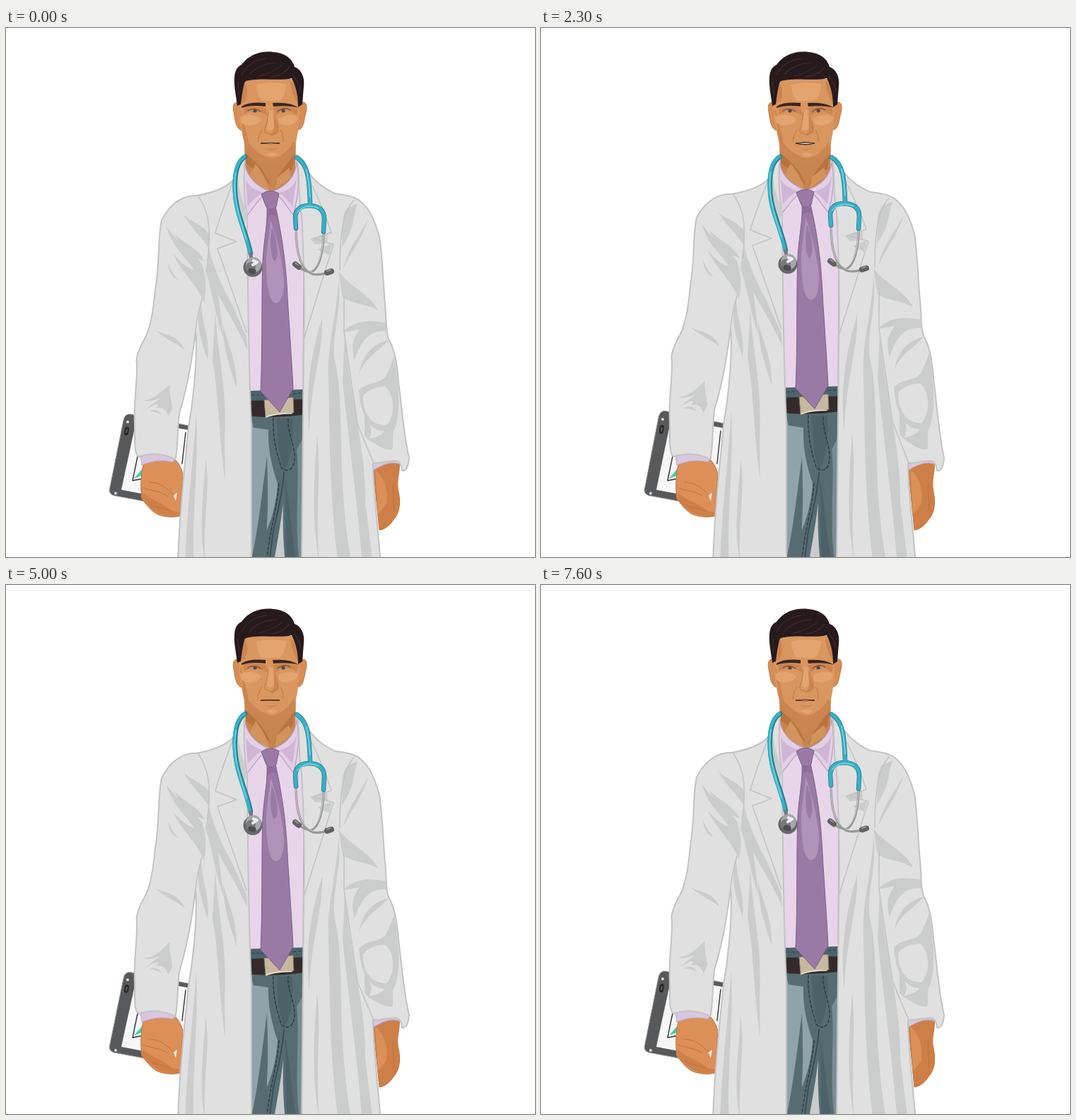
These frames come from a looping animation (748x748 px, 8 s). An HTML page:

```html
<!DOCTYPE html>
<html lang="en">
<head>
<meta charset="utf-8">
<title>Doctor</title>
<style>
html, body { margin: 0; width: 100%; height: 100%; overflow: hidden; background: #fff }
svg { display: block; width: 748px; height: 748px }
.line { fill: none; stroke-linecap: round; stroke-linejoin: round }
</style>
</head>
<body>
<svg viewBox="0 0 748 748">
<g id="body">
  <!-- tablet -->
  <path fill="#58595b" stroke="#a0a0a1" d="M176,546 L262,563 L262,640 L200,670 L152,661 Q144,658 147,649 L166,555 Q168,545 176,546 Z"/>
  <path fill="#f7f7f8" d="M184,556 L262,569 L262,640 L200,660 L163,653 Z"/>
  <path class="line" stroke="#333" stroke-width="1.4" d="M186,606 L179,640 L194,637 M254,572 L249,616"/>
  <path fill="#3fd0a2" d="M181,637 L193,623 L194,632 Z"/>
  <path class="line" stroke="#ddd" stroke-width="4" d="M172,557 L172,557 M155,658 L155,658"/>
  <path class="line" stroke="#292526" stroke-width="6" d="M171,567 L170,573"/>
  <path class="line" stroke="#705555" stroke-width="2" d="M171,568 L170,572"/>

  <!-- hands -->
  <g stroke="#c0713d" stroke-width="1">
    <path fill="#dd8f58" d="M197,609 C190,625 190,650 192,666 C200,675 207,686 218,689 C228,692 238,692 246,690 L250,630 C247,620 242,611 236,608 Z"/>
    <path fill="#cd7f47" d="M519,620 L556,613 C558,628 551,638 555,656 C559,674 555,688 548,695 C544,702 536,709 528,710 L526,690 Z"/>
  </g>
  <path fill="#dc8f58" d="M522,624 C533,634 541,650 538,672 C533,680 529,684 526,687 Z"/>
  <path fill="#cf8049" d="M193,657 C207,668 222,672 236,683 L246,685 L246,690 C222,693 207,684 193,666 Z"/>
  <path class="line" stroke="#c0713d" stroke-width="1" d="M194,650 C208,656 218,654 228,662 M202,642 C216,642 228,650 236,660 M204,674 C213,679 222,678 231,683 M548,645 C545,658 551,668 548,683"/>
  <path fill="#f6eee9" d="M237,661 L242,657 L240,669 Z"/>
  <g fill="#d9c6df" stroke="#b9a4c3" stroke-width="1">
    <path d="M190,602 C207,598 226,600 241,606 L236,614 C222,610 207,612 192,618 Z"/>
    <path d="M519,610 L560,607 L557,617 C546,612 533,617 520,625 Z"/>
  </g>

  <!-- jeans -->
  <path fill="#566c72" d="M345,505 L421,505 L420,760 L345,760 Z"/>
  <path fill="#8fa3a9" d="M347,554 L350,565 L371,568 C370,595 376,620 384,644 C382,675 375,695 369,710 L347,760 Z"/>
  <path fill="#566c72" d="M369,606 C370,640 371,672 369,700 L368,760 L345,760 C356,715 361,665 369,606 Z"/>
  <path fill="#768d94" d="M411,596 C416,640 407,690 415,757 L420,757 L420,580 Z"/>
  <path fill="#4c6168" d="M383,552 C384,590 388,612 393,626 C403,612 407,580 405,552 Z M393,632 C398,670 393,710 398,760 L412,760 C403,720 402,670 393,632 Z"/>
  <path fill="#c9cbcc" d="M392,671 C388,705 383,730 378,760 L395,760 C392,726 391,700 392,671 Z"/>
  <path class="line" stroke="#354850" stroke-width="1.6" d="M393,628 C391,660 384,683 378,711 L372,757"/>
  <path class="line" stroke="#2d3d44" stroke-width="1.5" stroke-dasharray="4 3" d="M378,552 C377,586 385,606 389,621 C397,630 409,625 408,604 C406,582 398,572 399,552 M386,644 C384,675 373,710 368,757"/>

  <!-- shirt and neck -->
  <path fill="#e8d5e9" stroke="#b9a5bf" stroke-width="1" d="M338,190 L414,188 L421,300 L420,515 L344,515 L340,300 Z"/>
  <path fill="#c98550" d="M337,160 L410,160 L409,206 Q396,226 376,231 Q350,222 338,205 Z"/>
  <path fill="#b9733f" d="M339,177 C352,190 364,196 375,224 C364,212 350,199 339,192 Z M409,177 L405,200 C394,204 386,214 378,226 C384,206 396,194 409,177 Z"/>
  <path fill="#d3935c" d="M353,192 C361,203 370,216 371,229 C360,225 350,216 345,208 Z M383,212 L400,198 L404,211 L380,228 Z"/>
  <g fill="#e3cfe6" stroke="#b6a0be" stroke-width="1.2">
    <path d="M338,194 C341,211 356,224 372,231 C358,240 351,253 341,265 C335,241 334,212 338,194 Z"/>
    <path d="M411,190 C409,211 396,224 377,231 C391,240 396,252 406,264 C414,240 415,211 411,190 Z"/>
  </g>
  <path fill="#cfb6d6" d="M339,215 C345,227 355,230 364,233 C354,237 347,246 342,252 Z M411,212 C407,225 397,231 385,233 C395,238 400,246 405,252 Z"/>

  <!-- belt and tie -->
  <path fill="#4c636b" d="M345,513 L420,511 L420,527 L345,529 Z"/>
  <path class="line" stroke="#31444b" stroke-width="1.2" stroke-dasharray="4 3" d="M347,519 L364,519 M406,517 L418,516"/>
  <path fill="#352a2b" d="M345,527 L420,525 L420,547 Q382,552 345,549 Z"/>
  <path fill="#c6b99f" stroke="#7c7161" stroke-width="1" d="M365,526 L406,522 L407,544 Q390,546 381,547 L367,551 Z"/>
  <path class="line" stroke="#eee8da" stroke-width="1.5" d="M368,550 Q379,545 404,545"/>
  <g fill="#9a7aa5" stroke="#7b5d87" stroke-width="1">
    <path d="M369,252 L381,252 C389,288 396,330 398,380 C401,430 404,470 406,510 L387,543 L360,514 C363,450 361,380 363,330 C365,295 370,280 369,252 Z"/>
    <path d="M361,235 Q373,226 386,234 L382,253 Q375,260 368,253 Z"/>
  </g>
  <path fill="#b193ba" d="M374,272 C382,292 392,330 393,358 C393,378 388,390 381,389 C371,386 368,360 368,330 C369,305 373,290 374,272 Z"/>
  <path fill="#9a7aa5" d="M376,282 C383,298 387,323 380,330 C373,325 373,300 376,282 Z"/>
  <path fill="#8d6d9a" d="M370,257 L381,257 L383,267 Q375,260 369,270 Z"/>

  <!-- coat -->
  <g fill="#e0e0e0" stroke="#c2c3c3" stroke-width="2" stroke-linejoin="round">
    <path d="M338,184 C328,194 326,206 322,214 C312,226 292,233 270,237 C245,236 228,255 220,272 C214,300 218,330 211,370 C208,400 205,425 194,443 C188,455 183,466 185,475 C186,500 180,530 182,560 C182,585 181,604 188,606 C205,600 225,602 239,610 C243,602 242,570 245,545 C256,510 263,470 268,430 C271,460 266,520 258,565 C253,620 245,680 243,760 L347,760 L347,560 C344,500 342,400 341,265 C337,245 335,220 338,184 Z"/>
    <path d="M412,186 C428,203 436,221 465,234 C480,236 492,238 500,244 C515,255 522,275 528,295 C533,330 533,360 536,390 C538,410 537,430 541,440 C550,455 553,475 555,500 C560,540 563,580 570,608 C569,620 566,627 560,626 C559,615 555,612 549,612 C540,612 528,616 519,615 L519,625 C522,680 527,720 530,760 L418,760 C420,600 421,500 421,440 C423,380 420,300 418,265 C413,240 416,215 412,186 Z"/>
  </g>
  <g fill="#cbcccc">
    <!-- left sleeve and panel folds -->
    <path d="M251,264 C263,275 278,278 288,292 L287,312 C278,296 264,287 251,264 Z"/>
    <path d="M227,281 C240,301 262,312 277,334 C283,350 284,370 280,388 C270,362 247,344 236,319 C247,332 258,340 266,342 C253,322 235,310 227,281 Z"/>
    <path d="M238,290 C252,306 270,309 281,330 C263,323 249,313 238,290 Z"/>
    <path d="M229,333 C234,343 237,350 244,356 C235,354 230,345 229,333 Z"/>
    <path d="M211,427 C227,436 241,432 253,455 C238,444 226,440 211,427 Z"/>
    <path d="M194,527 C209,525 220,515 232,503 C230,516 234,525 235,538 L230,549 C226,539 221,535 212,538 C221,528 210,531 197,540 C204,533 215,526 219,523 C209,526 202,529 194,527 Z"/>
    <path d="M202,542 Q214,536 220,547 Q210,542 202,542 Z"/>
    <path d="M287,312 C292,332 301,358 319,390 L340,436 L341,455 C326,420 310,397 300,377 L308,440 C296,408 292,372 282,343 Z"/>
    <path d="M276,384 C276,420 289,435 285,470 C277,443 266,419 276,384 Z"/>
    <path d="M296,401 C299,465 313,505 309,585 L310,640 C300,570 301,520 292,470 Z"/>
    <path d="M307,420 C315,452 327,472 326,510 C317,480 307,455 307,420 Z"/>
    <path d="M269,545 C273,620 262,690 266,760 L253,760 C255,690 264,620 269,545 Z"/>
    <path d="M282,610 C290,650 277,700 282,757 C271,710 280,660 282,610 Z"/>
    <!-- right sleeve and panel folds -->
    <path d="M497,248 C490,270 493,284 475,310 C477,288 472,270 482,255 Z"/>
    <path d="M512,270 C503,300 489,315 477,340 C483,313 497,298 512,270 Z"/>
    <path d="M470,344 C484,365 515,376 526,399 C508,389 493,391 476,381 Z"/>
    <path d="M477,430 C490,414 514,412 537,417 L538,429 C517,426 502,440 493,470 C488,452 489,440 500,426 Z"/>
    <path d="M541,441 C528,457 508,465 499,489 C506,456 521,447 541,441 Z"/>
    <path fill-rule="evenodd" d="M499,512 C512,500 526,504 536,494 C543,482 546,471 549,464 C555,500 559,540 550,566 C544,574 549,588 546,596 C533,598 520,586 510,581 C521,580 532,576 535,570 C518,570 502,554 499,512 Z M505,520 C504,548 519,562 538,562 C550,549 551,520 536,507 C524,508 514,510 505,520 Z"/>
    <path d="M507,548 C517,562 519,571 513,582 L507,577 Z"/>
    <path d="M470,355 C477,400 456,440 467,480 C479,540 467,640 489,760 L470,760 C456,650 458,560 456,500 C453,450 469,400 470,355 Z"/>
    <path d="M447,410 C449,460 430,500 429,575 C422,510 432,460 447,410 Z"/>
    <path d="M479,432 C485,520 509,590 508,670 L519,760 L504,760 C496,660 484,580 476,500 Z"/>
    <path d="M440,575 C446,630 437,680 443,757 C431,690 436,630 440,575 Z"/>
    <path d="M430,298 L454,290 L455,304 L437,306 Z M440,313 L461,305 L457,321 Z"/>
    <path d="M327,199 C328,224 333,240 341,262 L337,279 C329,255 323,232 327,199 Z"/>
  </g>
  <path class="line" stroke="#c2c3c3" stroke-width="1.6" d="M322,215 C313,239 303,264 296,290 L326,302 L299,312 L340,430 M433,223 C444,246 453,268 460,289 L434,298 L463,306 L421,440 M272,238 C285,257 291,277 285,330 M492,243 C477,260 472,290 472,342 M268,430 C269,411 273,400 277,383 M478,380 L478,430 L497,560 L519,613"/>

  <!-- stethoscope -->
  <g class="line">
    <path stroke="#969898" stroke-width="3.2" d="M410,285 C410,320 418,343 434,348 Q445,350 457,345 M449,289 C449,316 443,340 432,345 Q421,345 411,335"/>
    <path stroke="#d2d4d4" stroke-width="1" d="M410,287 C410,320 418,341 434,346 M449,290 C448,318 442,338 432,343"/>
    <path stroke="#606262" stroke-width="8" d="M409,334 L414,338 M454,346 L460,344"/>
    <path stroke="#8f9191" stroke-width="2" d="M409,332 L413,335 M454,344 L459,342"/>
    <path stroke="#23798a" stroke-width="6.500" d="M338,182 C325,190 323,210 324,231 C325,263 341,291 346,319 M411,183 C428,193 429,217 430,248 M410,283 L409,268 Q410,251 429,251 Q450,252 450,270 L449,288"/>
    <path stroke="#36b0c6" stroke-width="5" d="M337,182 C324,190 322,210 323,231 C324,263 340,291 345,319 M411,183 C428,193 429,217 430,248 M410,283 L409,268 Q410,251 429,251 Q450,252 450,270 L449,288"/>
    <path stroke="#7bd5e2" stroke-width="1.5" d="M325,205 C319,238 331,270 340,300 M425,200 Q429,220 430,239 M412,261 Q424,247 442,255"/>
    <path stroke="#777" stroke-width="5" d="M346,320 L347,326"/>
    <path stroke="#666768" stroke-width="27" d="M349,338.500 L349,338.500"/>
    <path stroke="#a5a7a8" stroke-width="22" d="M350,335 L350,335"/>
    <path stroke="#777879" stroke-width="14" d="M346,338 L346,338"/>
    <path stroke="#4c4d4e" stroke-width="7" d="M346,343 L350,344"/>
    <path stroke="#eee" stroke-width="4" d="M350,329 L355,331 L349,335"/>
  </g>
</g>

<!-- head -->
<g fill="#d58d54" stroke="#c07a47" stroke-width="1">
  <path d="M330,107 C322,102 320,110 322,119 C324,128 324,143 334,145 Z"/>
  <path d="M415,107 C424,101 427,109 424,120 C421,132 421,144 412,144 Z"/>
</g>
<path fill="#da965f" d="M330,72 L414,72 L416,107 C415,131 413,151 409,165 C403,177 391,190 375,190 C360,190 345,179 338,167 C333,148 329,129 329,107 Z"/>
<g fill="#cc8550">
  <path d="M330,111 C335,130 340,145 343,163 C352,174 364,182 375,184 C389,184 400,172 407,160 L408,168 C398,183 388,190 375,190 C357,189 345,179 338,168 Z"/>
  <path d="M337,77 C342,84 343,98 337,105 L331,107 Z M402,75 L414,84 L414,108 C407,101 404,89 402,75 Z"/>
  <path d="M336,113 C347,109 359,111 367,113 L370,124 Q352,113 336,122 Z M378,113 Q398,107 413,115 L411,123 Q395,112 381,124 Z"/>
  <path d="M379,118 L386,141 Q384,151 374,153 L379,144 Z M365,169 Q375,173 385,169 Q375,177 365,169 Z"/>
</g>
<g fill="#e4a46f">
  <path d="M354,80 Q374,75 396,79 Q395,98 386,103 L361,103 Q354,92 354,80 Z"/>
  <path d="M331,126 C344,120 355,123 361,129 C357,139 340,140 333,134 Z M385,128 C396,122 407,121 413,127 C410,138 393,141 386,134 Z"/>
  <path d="M371,116 L377,116 L379,140 Q375,148 369,143 Z M368,178 Q376,174 384,178 Q376,185 368,178 Z"/>
</g>
<path class="line" stroke="#bd7846" stroke-width="1" d="M371,119 Q370,133 366,143 Q365,149 371,149 Q376,153 381,149 Q388,148 383,139 M362,144 Q357,151 356,161 M388,144 Q393,151 392,161"/>
<g id="eyes">
  <path fill="#b99378" d="M343,117 Q351,112 359,118 Q350,122 343,117 Z M385,118 Q393,112 401,116 Q393,122 385,118 Z"/>
  <path class="line" stroke="#60443a" stroke-width="5" d="M352,117 h.1 M392,117 h.1"/>
  <path class="line" stroke="#7a4c35" stroke-width="1.2" d="M342,117 Q351,112 360,118 M384,118 Q393,111 402,116"/>
</g>
<path id="lids" class="line" stroke="#c07c4a" stroke-width="1.1" d="M341,119 Q351,123 361,120 M383,120 Q393,123 403,118"/>
<path fill="#3a2420" d="M333,111 Q343,104 367,106 L367,111 Q347,108 333,113 Z M377,106 Q402,104 414,113 Q401,109 378,111 Z"/>
<path id="mouth" fill="#2c1918" stroke="#3c211c"/>
<path id="teeth" fill="#f5f1ed"/>
<path fill="#261a1c" d="M327,110 L324,89 C322,70 322,57 333,52 C344,37 361,32 378,34 C395,35 405,44 408,55 C417,58 423,69 421,83 L419,108 L413,112 C413,95 410,83 404,71 C390,75 365,71 352,73 C342,74 338,74 337,78 C334,90 333,100 332,108 Z"/>
<path class="line" stroke="#3b282a" stroke-width="1.5" d="M333,66 Q344,46 368,43 M344,66 Q356,51 382,49 M357,68 Q374,65 390,53 M376,69 Q392,67 400,56 M407,69 Q415,76 416,89 M328,76 L329,94"/>
</svg>
<script>
const $ = id => document.getElementById(id);
const parts = [...$('body').querySelectorAll('path')].map(el => ({ el, d: el.getAttribute('d') }));

const breath = [[500, 0], [1700, -6], [2900, -3], [4100, 2.7], [5000, 1.6], [6200, .4], [7600, 0]];
const speech = [[500, .15], [800, .7], [1200, .1], [1700, 1], [2100, .1], [2500, .7], [2900, .05],
  [3500, .8], [4100, 0], [4500, .7], [5000, 0], [5500, .8], [6200, .1], [6800, .7], [7200, .1], [7600, .15]];
const blinks = [1700, 5800];

// Eased value between neighbouring keys, held at both ends
function sample(keys, t) {
  const next = keys.findIndex(k => k[0] > t);
  if (next === 0) return keys[0][1];
  if (next < 0) return keys.at(-1)[1];
  const [t0, a] = keys[next - 1], [t1, b] = keys[next];
  return a + (b - a) * (1 - Math.cos(Math.PI * (t - t0) / (t1 - t0))) / 2;
}

// The torso moves as one; neck and hem stretch to the fixed head and hands
const weight = y => Math.max(0, Math.min(1, (y - 180) / 110, (598 - y) / 50));

function draw(t) {
  const lift = sample(breath, t), open = sample(speech, t);
  for (const { el, d } of parts)
    el.setAttribute('d', d.replace(/([\d.]+),([\d.]+)/g,
      (_, x, y) => `${x},${(+y + lift * weight(+y)).toFixed(2)}`));
  const closed = blinks.some(b => Math.abs(t - b) <= 100);
  $('eyes').style.display = closed ? 'none' : '';
  $('lids').style.display = closed ? '' : 'none';
  $('mouth').setAttribute('d', `M360,163 Q374,${162 - 5 * open} 387,163 Q374,${163 + 10 * open} 360,163 Z`);
  $('teeth').setAttribute('d', `M363,163 Q374,${163 - 3 * open} 385,163 Q374,${163 + 5 * open} 363,163 Z`);
}

let last = -1;
function tick() {
  const t = Math.floor(performance.now() % 8000 / 100) * 100;
  if (t !== last) draw(last = t);
  requestAnimationFrame(tick);
}
tick();
</script>
</body>
</html>
```
